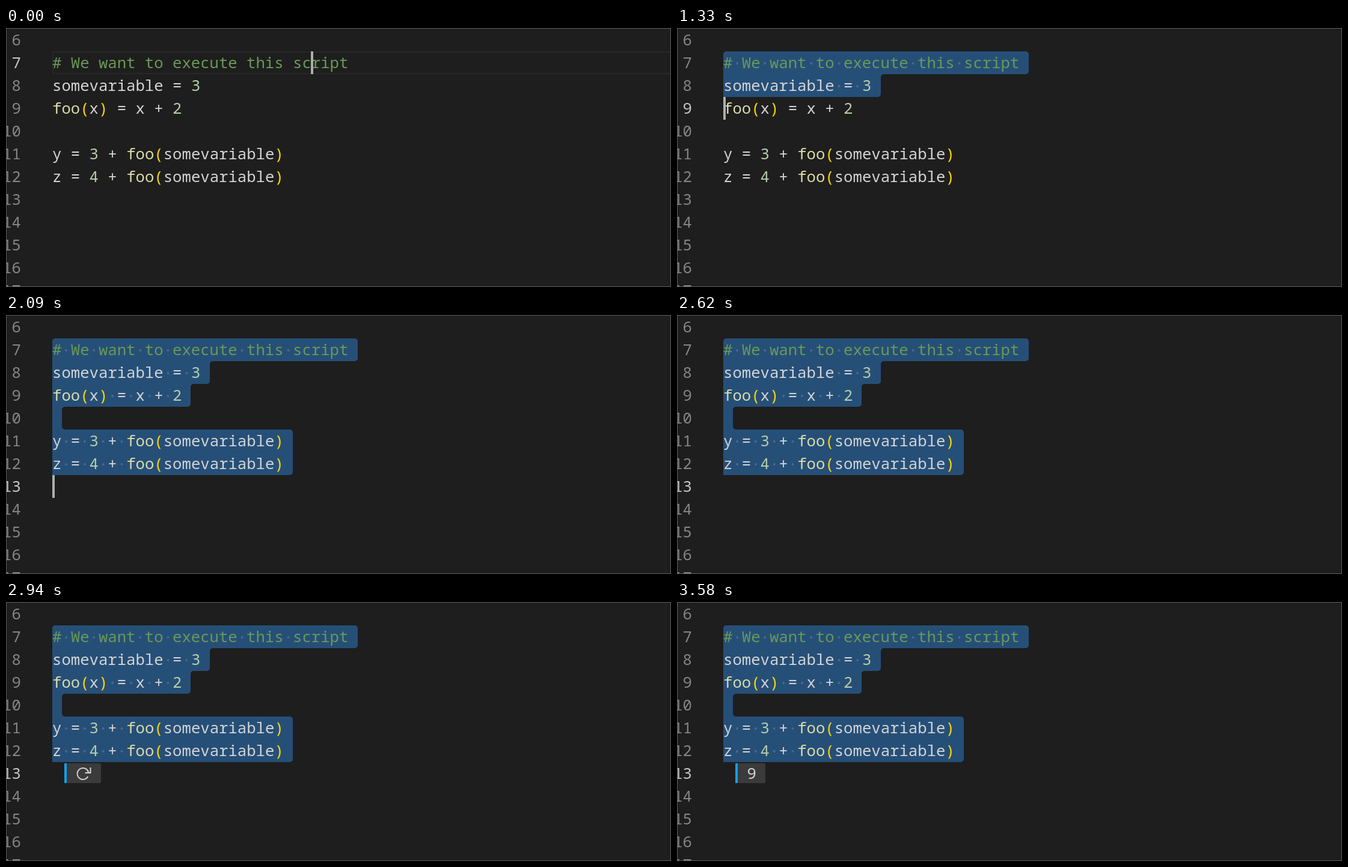
An HTML page with a canvas for the animation above (3830 ms loop, 1106 px wide and 432 px high).

```html
<!DOCTYPE html>
<html lang="en">
<head>
<meta charset="utf-8">
<title>Running a selection in an editor</title>
<style>
html, body { margin: 0; width: 100%; height: 100%; overflow: hidden; background: #1e1e1e; }
canvas { display: block; width: 1106px; height: 432px; }
</style>
</head>
<body>
<canvas id="stage" width="1106" height="432"></canvas>
<script>
const ctx = document.getElementById('stage').getContext('2d');
const W = 1106, H = 432, LOOP = 3830;
const LEFT = 77, LINE_H = 38, CHAR_W = 15.394, BASELINE = 28, FIRST = 6;

const code = {
  7: '# We want to execute this script',
  8: 'somevariable = 3',
  9: 'foo(x) = x + 2',
  10: '',
  11: 'y = 3 + foo(somevariable)',
  12: 'z = 4 + foo(somevariable)'
};
const selectionRight = { 7: 585, 8: 339, 9: 307, 10: 93, 11: 477, 12: 477 };

const colors = {
  back: '#1e1e1e', text: '#d4d4d4', comment: '#6a9955', number: '#b5cea8',
  call: '#dcdcaa', bracket: '#ffd700', selection: '#264f78',
  gutter: '#858585', gutterActive: '#c6c6c6'
};

// Each step overrides part of the editor state from its time on.
const steps = [
  { at: 0, line: 7, caretX: 507, caret: true, flash: false, result: '' },
  { at: 250, caretX: LEFT },
  { at: 810, caret: false },
  { at: 930, line: 8, caret: true },
  { at: 1330, line: 9 },
  { at: 1580, line: 10 },
  { at: 1720, line: 11 },
  { at: 1970, line: 12 },
  { at: 2090, line: 13 },
  { at: 2620, caret: false },
  { at: 2770, flash: true, result: 'busy' },
  { at: 2940, flash: false },
  { at: 3060, result: '9' },
  { at: 3180, caret: true },
  { at: 3580, caret: false }
];

const stateAt = t => Object.assign({}, ...steps.filter(s => s.at <= t));
const lineTop = line => 1 + (line - FIRST) * LINE_H;

function rect(color, x, y, w, h) {
  ctx.fillStyle = color;
  ctx.fillRect(x, y, w, h);
}

function text(str, x, line, color) {
  ctx.fillStyle = color;
  ctx.fillText(str, x, lineTop(line) + BASELINE);
}

function tokenColor(token) {
  if (token[0] === '#') return colors.comment;
  if (token === 'foo') return colors.call;
  if (/[()]/.test(token)) return colors.bracket;
  if (/\d/.test(token)) return colors.number;
  return colors.text;
}

function drawCode() {
  for (const line in code) {
    for (const m of code[line].matchAll(/#.*|\w+|[^\s\w]/g)) {
      text(m[0], LEFT + m.index * CHAR_W, +line, tokenColor(m[0]));
    }
  }
}

function drawGutter(active) {
  for (let n = FIRST; n <= 17; n++) {
    const x = 25 - String(n).length * CHAR_W;
    text(n, x, n, n === active ? colors.gutterActive : colors.gutter);
  }
}

function drawSelection(end) {
  const points = [[LEFT, lineTop(7)]];
  for (let n = 7; n < end; n++) {
    const x = selectionRight[n];
    if (x === selectionRight[n - 1]) points.pop();
    else points.push([x, lineTop(n)]);
    points.push([x, lineTop(n + 1)]);
  }
  ctx.beginPath();
  ctx.moveTo(LEFT, lineTop(end));
  points.forEach(([x, y], i) => {
    const [nextX, nextY] = points[i + 1] || [LEFT, lineTop(end)];
    ctx.arcTo(x, y, nextX, nextY, 5);
  });
  ctx.closePath();
  ctx.fillStyle = colors.selection;
  ctx.fill();

  ctx.fillStyle = 'rgba(227,228,226,0.18)';
  for (let n = 7; n < end; n++) {
    for (const m of code[n].matchAll(/ /g)) {
      ctx.beginPath();
      ctx.arc(LEFT + (m.index + 0.5) * CHAR_W, lineTop(n) + 20, 2, 0, 7);
      ctx.fill();
    }
  }
}

function drawSpinner() {
  ctx.strokeStyle = colors.text;
  ctx.lineWidth = 2;
  ctx.beginPath();
  ctx.arc(128, 286.5, 9.5, 0.5, Math.PI * 2 - 0.25);
  ctx.moveTo(140.5, 276);
  ctx.lineTo(140.5, 285);
  ctx.lineTo(131.5, 285);
  ctx.stroke();
}

function drawResult({ result, flash }) {
  const busy = result === 'busy';
  ctx.beginPath();
  ctx.roundRect(97, 269, busy ? 61 : 50, 33, 2);
  ctx.fillStyle = flash ? '#3e464f' : '#3b3b3b';
  ctx.fill();
  rect('#159eed', 97, 269, 4, 33);
  if (busy) drawSpinner();
  else text(result, 101 + CHAR_W, 13, colors.text);
}

function drawLineFrame(line) {
  ctx.strokeStyle = '#282828';
  ctx.lineWidth = 2;
  ctx.strokeRect(LEFT + 1, lineTop(line) + 1, W - LEFT, LINE_H - 2);
}

function draw(t) {
  const s = stateAt(t);
  rect(colors.back, 0, 0, W, H);
  ctx.font = '25.657px "Noto Sans Mono", monospace';
  if (s.flash) rect('#212b35', LEFT, lineTop(7), W - 1 - LEFT, LINE_H * 7);
  if (s.line > 7) drawSelection(s.line);
  else drawLineFrame(s.line);
  drawCode();
  drawGutter(s.line);
  if (s.result) drawResult(s);
  if (s.caret) rect('#aeafad', s.caretX, lineTop(s.line), 4, LINE_H);
  ctx.strokeStyle = '#606060';
  ctx.lineWidth = 1;
  ctx.strokeRect(0.5, 0.5, W - 1, H - 1);
}

const start = performance.now();
function tick() {
  draw((performance.now() - start) % LOOP);
  requestAnimationFrame(tick);
}
tick();
</script>
</body>
</html>
```
